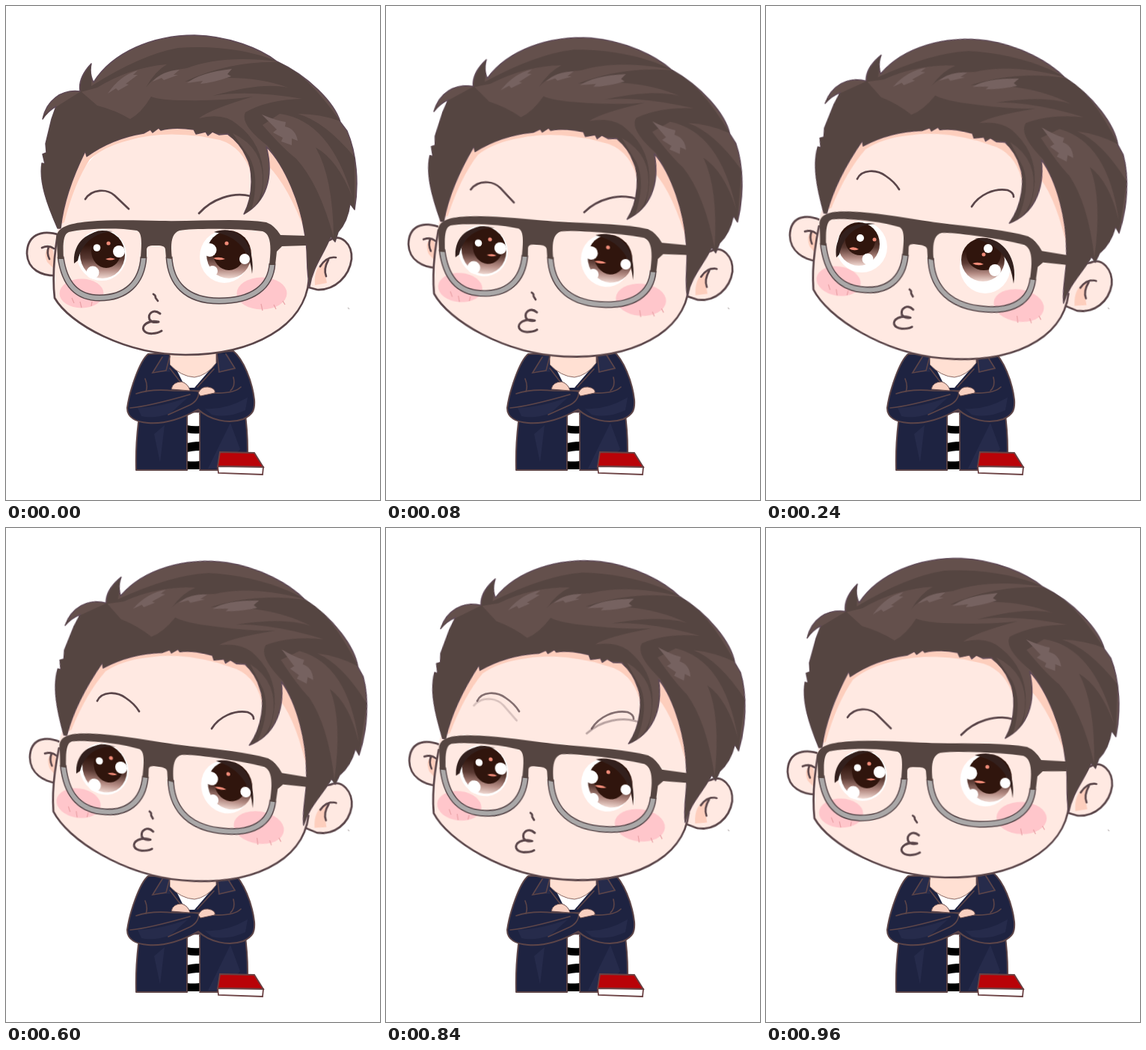
Write an HTML page that moves like this. It is 500 px wide and 660 px high and loops after 1000 ms.

```html
<!DOCTYPE html>
<html lang="en">
<head>
<meta charset="utf-8">
<title>Head tilt</title>
<style>
html, body { margin: 0; width: 100%; height: 100%; overflow: hidden; background: #fff; }
svg { display: block; width: 100%; height: 100%; }

/* Each part of the head leans by its own matrix. */
.part { transform-origin: 0 0; animation: lean 1s infinite; }
.hair   { --tilt: matrix(.985, .13, -.147, .985, 53, -25); }
.frame  { --tilt: matrix(.992, .135, -.03, 1, 14, -28.2); }
.face   { --tilt: matrix(1, .09, -.04, 1, 14, -17); }
.cheeks { --tilt: matrix(1, .135, -.1, 1, 34.4, -30); }
.mouth  { --tilt: matrix(1, .1, -.155, 1, 54.5, -26); }
.brows  { --tilt: matrix(1, .15, -.1, 1, 40, -42); }
@keyframes lean {
  0% { transform: matrix(1, 0, 0, 1, 0, 0); animation-timing-function: steps(4); }
  16% { transform: var(--tilt); }
  80% { transform: var(--tilt); animation-timing-function: steps(5); }
  100% { transform: matrix(1, 0, 0, 1, 0, 0); }
}

.raised { animation: raise 1s infinite; }
@keyframes raise {
  0%, 16% { opacity: 0; animation-timing-function: steps(2); }
  24% { opacity: 1; }
  80% { opacity: 1; animation-timing-function: steps(4); }
  96%, 100% { opacity: 0; }
}
.resting { animation: rest 1s infinite; }
@keyframes rest {
  0%, 16% { opacity: 1; animation-timing-function: steps(2); }
  24%, 79.99% { opacity: 0; }
  80% { opacity: var(--ghost); animation-timing-function: steps(4); }
  96%, 100% { opacity: 1; }
}

.ahead { animation: ahead 1s step-end infinite; }
.upward { animation: upward 1s step-end infinite; }
@keyframes ahead { 0% { opacity: 1; } 24% { opacity: 0; } 60% { opacity: 1; } }
@keyframes upward { 0% { opacity: 0; } 24% { opacity: 1; } 60% { opacity: 0; } }

.line { fill: none; stroke: #5b464a; stroke-width: 2.7; stroke-linecap: round; stroke-linejoin: round; }
.skin { fill: #ffe9e2; }
.peach { fill: #fdcebd; }
.cloth { fill: #1e2341; stroke: #5d4548; stroke-width: 2; stroke-linejoin: round; }
.seam { fill: none; stroke: #5d4548; stroke-width: 1.6; stroke-linecap: round; }
.fold { fill: #262b4b; }
.dark { fill: #554541; }
.light { fill: #64504c; }
.shine { fill: #766260; }
.glint { fill: #fff; }
.spark { fill: #f08b78; }
</style>
</head>
<body>
<svg viewBox="0 0 500 660">
  <defs>
    <linearGradient id="iris" x1="0" y1="0" x2="0" y2="1">
      <stop offset=".3" stop-color="#30150d"/>
      <stop offset=".58" stop-color="#593932"/>
      <stop offset=".82" stop-color="#b48b83"/>
      <stop offset="1" stop-color="#f0d8d1"/>
    </linearGradient>
    <clipPath id="hairClip"><use href="#hairShape"/></clipPath>
    <g id="rims">
      <path d="M73 335C78 372 95 390 125 390C160 390 182 370 184 335"/>
      <path d="M218 335C220 370 240 394 285 394C330 394 354 375 356 344"/>
    </g>
  </defs>

  <g id="body">
    <path class="cloth" d="M183 545L177 556Q173 590 174 620H242V540H259V620H322Q325 580 319 540Z"/>
    <path class="fold" d="M212 560L206 610 198 572ZM300 557L313 592 292 617 270 618Z"/>
    <path class="glint" d="M243 546H259V620H243Z"/>
    <path d="M242 560Q250 562 259 561V571Q250 572 242 570ZM242 584Q250 582 259 582V594Q250 594 242 596ZM242 608Q250 609 259 608V619H242Z"/>
    <path class="seam" d="M242 546V620M259 546V619"/>
    <path class="cloth" d="M190 465C178 475 165 515 162 537C162 550 174 556 190 557C217 559 241 548 257 539C272 553 297 559 317 552C330 546 333 540 332 526C329 500 317 472 304 461Z"/>
    <path class="fold" d="M176 537Q207 536 243 523L220 544Q198 552 181 548ZM266 538Q294 540 323 523L320 540Q297 551 275 546Z"/>
    <path class="glint" d="M225 480L240 510H252L276 482Z"/>
    <path fill="#ffe0d3" stroke="#8b6a65" d="M219 462V479Q234 495 252 496Q268 494 281 477V462Z"/>
    <path class="fold" d="M196 488L211 466 219 468V489ZM284 464L297 466 307 486 283 490Z"/>
    <path class="seam" d="M219 468L214 487 196 490 209 469M219 484L239 510M282 464L285 489 306 484 294 465M278 485L256 509M186 498Q190 508 187 515M304 496Q307 508 300 514"/>
    <path class="seam" d="M174 518Q194 511 224 514L258 514Q258 527 246 533L217 546M248 514L278 517Q305 518 314 509M166 537Q190 535 246 519"/>
    <path fill="#f8d0c1" stroke="#6c5050" d="M221 512Q223 502 235 502Q244 505 246 514ZM257 517Q261 508 270 509Q281 511 279 517L260 521Z"/>
    <path fill="#b90308" stroke="#6b4143" stroke-width="1.8" d="M286 596L332 597 344 616 283 615Z"/>
    <path fill="#fff" stroke="#6b4143" stroke-width="1.8" d="M283 615L344 616 343 626 284 624Z"/>
    <path stroke="#c9c4c4" stroke-width="1.5" d="M457 403L459 405"/>
  </g>

  <g class="part frame">
    <g class="line">
      <path class="skin" d="M72 306C45 297 28 308 28 331C29 351 46 362 72 360"/>
      <path class="skin" d="M390 325L432 313C448 303 463 318 462 338C459 361 440 380 416 379L390 372Z"/>
    </g>
    <path class="peach" d="M62 322Q48 324 55 342L67 354ZM427 340Q411 349 413 373L429 370Q424 352 431 341Z"/>
    <path class="line" d="M48 323Q57 319 64 324M57 322Q54 330 58 338M441 336Q429 334 420 348M431 339Q424 352 428 361"/>
  </g>

  <g class="part face">
    <path class="skin" d="M70 290C66 320 62 360 65 390C85 425 160 466 240 466C330 466 400 428 405 365L404 300C390 200 300 155 200 160C130 165 85 230 70 290Z"/>
    <path class="line" d="M69 305C65 330 62 365 65 390C85 425 160 466 240 466C330 466 400 428 405 365"/>
  </g>

  <g class="part cheeks">
    <g fill="#ffc6cb">
      <ellipse cx="101" cy="384" rx="29.5" ry="19.5"/>
      <ellipse cx="342" cy="384" rx="33.5" ry="21.5"/>
    </g>
    <path fill="none" stroke="#e9a0a5" stroke-width="1.2" d="M88 390L91 397M99 395L101 403M115 395L114 401M341 398L343 407M358 399L361 405M370 394L373 399"/>
  </g>

  <g class="part hair peach">
    <path d="M72 292Q88 225 107 193L190 160 296 167Q322 190 328 224Q316 188 286 179L260 174Q205 167 166 179Q132 187 112 205Q91 237 78 289Z"/>
    <path d="M346 184Q382 220 401 304Q377 240 351 214Z"/>
  </g>

  <g class="part frame">
    <g class="ahead">
      <ellipse class="glint" cx="128" cy="333" rx="33" ry="34"/>
      <ellipse cx="129" cy="332" rx="30" ry="32" fill="url(#iris)"/>
      <ellipse cx="134" cy="327" rx="20" ry="23" fill="#30150d"/>
      <path fill="#33201d" d="M91 344C89 316 109 297 143 301C118 303 102 316 96 340Z"/>
      <circle class="glint" cx="121.5" cy="323" r="4.8"/>
      <circle class="glint" cx="151" cy="328" r="8"/>
      <circle class="glint" cx="116" cy="356" r="8.5"/>
      <circle class="spark" cx="137" cy="317" r="2.6"/>
      <path class="spark" d="M133 338Q140 335 146 338Q139 341 133 338Z"/>

      <ellipse class="glint" cx="292" cy="335" rx="33" ry="35"/>
      <ellipse cx="298" cy="332" rx="30" ry="32" fill="url(#iris)"/>
      <ellipse cx="298" cy="327" rx="22" ry="26" fill="#30150d"/>
      <path fill="#33201d" d="M278 302C310 290 334 318 329 358C327 329 310 307 278 302Z"/>
      <circle class="glint" cx="272.5" cy="326" r="9"/>
      <circle class="glint" cx="276" cy="354" r="7"/>
      <circle class="glint" cx="319" cy="338" r="7"/>
      <circle class="spark" cx="295" cy="317" r="2.6"/>
      <path class="spark" d="M277 337Q285 334 293 338Q284 341 277 337Z"/>
    </g>
  </g>

  <g class="upward">
    <ellipse class="glint" cx="128" cy="322" rx="34" ry="34"/>
    <ellipse cx="124" cy="318" rx="28" ry="29" fill="url(#iris)"/>
    <ellipse cx="126" cy="313" rx="20" ry="20" fill="#30150d"/>
    <path fill="#33201d" d="M94 336C90 307 111 286 146 291C119 293 104 306 98 332Z"/>
    <circle class="glint" cx="126" cy="310" r="5"/>
    <circle class="glint" cx="136" cy="338" r="7.5"/>
    <path class="spark" d="M111 324Q117 320 124 325Q117 328 111 324Z"/>
    <circle class="spark" cx="145" cy="312" r="2.5"/>

    <ellipse class="glint" cx="293" cy="348" rx="34" ry="36"/>
    <ellipse cx="290" cy="339" rx="29" ry="29" fill="url(#iris)"/>
    <ellipse cx="291" cy="332" rx="23" ry="21" fill="#30150d"/>
    <path fill="#33201d" d="M279 311C313 303 338 335 331 371C327 340 313 318 279 311Z"/>
    <circle class="glint" cx="297" cy="324" r="6"/>
    <circle class="glint" cx="306" cy="353" r="8"/>
    <circle class="spark" cx="291" cy="332" r="2.5"/>
    <path class="spark" d="M276 344Q284 341 291 345Q283 348 276 344Z"/>
  </g>

  <g class="part mouth line">
    <path d="M197 385Q200 386 200 390L203 394"/>
    <path stroke-width="3" d="M206 411C197 404 189 411 192 419C195 423 200 423 204 422C190 419 181 427 184 433C188 440 202 438 208 434"/>
  </g>

  <g class="part brows line">
    <path class="resting" style="--ghost:0" d="M106 258C115 244 135 244 145 253L164 271"/>
    <path class="resting" style="--ghost:.25" d="M258 277C275 258 303 248 327 254"/>
  </g>
  <g class="raised line">
    <path d="M122 231C128 218 148 218 160 227Q172 235 178 245"/>
    <path d="M275 268C285 252 305 243 323 246Q331 249 331 255"/>
  </g>

  <g class="part hair">
    <path id="hairShape" class="light" stroke="#5f4957" stroke-width="1.5" stroke-linejoin="round" d="M69 297C55 265 44 235 48 210L52 211 49 198 54 196 53 184 61 151 67 134C60 138 54 143 49 151C54 126 74 111 99 114Q96 96 114 77Q111 90 117 102C142 62 196 39 252 39C298 40 340 57 362 74C405 94 439 129 447 155L456 167C469 197 472 238 466 272L460 264Q457 288 444 302L440 315 434 308C426 330 410 348 406 375C400 350 405 328 399 302C394 266 374 214 348 188C359 230 347 262 318 278C332 252 330 216 321 201Q313 183 296 171L285 172 276 168 270 173 267 168 254 171 251 165Q224 161 207 166L204 163 196 169 193 165 184 170Q141 177 108 201L106 194C90 226 77 260 73 297Z"/>
    <g clip-path="url(#hairClip)">
      <path class="dark" d="M40 152L100 114 122 133Q146 139 166 151Q181 143 194 121Q207 126 238 126Q290 127 330 121Q273 138 258 150Q291 142 309 158Q356 193 340 263L318 280Q332 219 297 170L180 174 108 203 75 300H40Z"/>
      <path class="dark" d="M100 115Q97 96 115 77L114 107Q180 65 230 56Q305 51 363 74Q289 65 242 83Q202 88 187 109Q199 87 215 78Q166 82 122 109Z"/>
      <path class="dark" d="M239 101Q300 73 365 75Q400 88 447 154Q420 144 390 144Q426 154 466 202V275L443 317 406 377 399 302Q385 233 350 187Q312 158 320 142Q350 125 396 124Q325 112 276 120Q342 101 377 109Q319 88 239 101Z"/>
      <path class="light" d="M366 144Q433 153 463 255Q443 205 414 189Q437 229 438 309Q419 238 388 204Q370 190 343 159Z"/>
      <path class="light" d="M303 170Q346 190 343 238Q342 258 328 273Q340 228 325 201Z"/>
      <path class="shine" d="M136 117Q152 93 176 86L170 92 176 92 160 104 164 105 150 113 147 110ZM196 101Q208 87 232 85L224 92 230 92 211 99 208 96ZM242 103Q259 89 302 84L296 91 301 94Q279 102 260 104L263 100ZM342 145Q361 153 374 155L373 161Q387 164 390 180L382 177 382 186 368 181 370 176 357 169 362 165Z"/>
    </g>
  </g>

  <g class="part frame">
    <use href="#rims" fill="none" stroke="#57474a" stroke-width="9"/>
    <use href="#rims" fill="none" stroke="#aaa8a8" stroke-width="6"/>
    <path class="dark" d="M68 316C64 298 78 291 110 288C150 285 180 287 205 287C260 288 310 283 348 289Q359 293 367 306L403 307 401 320 369 321 362 328 360 346H352C355 320 354 305 343 301C310 297 250 297 232 300C220 304 220 320 222 338L214 337 213 325C212 320 207 320 200 320C193 320 189 320 188 325V337H180C181 320 183 303 175 300C150 296 105 297 84 302C76 305 76 320 77 338H69Z"/>
  </g>
</svg>
</body>
</html>
```
